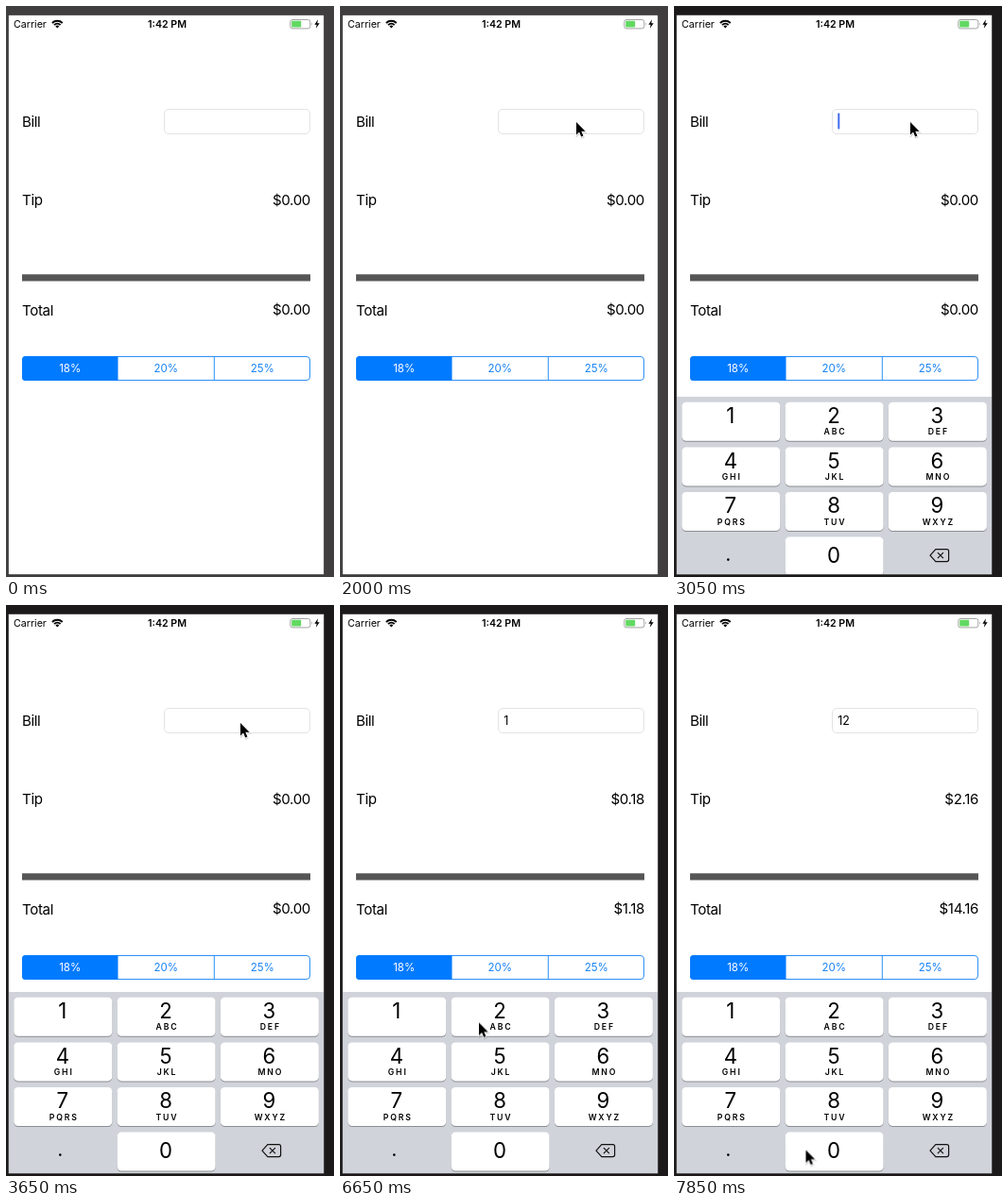
Animation of 347 by 605 pixels, one loop 8000 ms. Source, as an HTML page:

```html
<!DOCTYPE html>
<html lang="en">
<head>
<meta charset="utf-8">
<title>Tip calculator</title>
<style>
html, body { margin: 0; width: 100%; height: 100%; overflow: hidden; }
svg { display: block; width: 347px; height: 605px; font-family: Inter, Roboto, "Liberation Sans", sans-serif; }
.anim { animation: 8s step-end infinite; }

.label { font-size: 15.1px; letter-spacing: -.36px; }
.end { text-anchor: end; }
.status { font-size: 10.66px; }
.entry { font-size: 12.4px; }
.seg { font-size: 11.5px; text-anchor: middle; fill: #1682f5; }
.digit { font-size: 22.2px; text-anchor: middle; }
.letters { font-size: 8.7px; font-weight: 600; letter-spacing: 1.8px; text-anchor: middle; }

#chrome { animation-name: chrome; }
@keyframes chrome { 0% { fill: #403e3e; } 28.75%, 100% { fill: #1b1919; } }

#pad { animation-name: rise; }
@keyframes rise {
  0% { transform: translateY(192px); }
  34.375% { transform: translateY(92px); }
  36.25% { transform: translateY(20px); }
  38.125% { transform: translateY(4px); }
  40% { transform: translateY(1px); }
  41.875%, 100% { transform: none; }
}

#empty { animation-name: empty; }
#one { animation-name: one; }
#twelve { animation-name: twelve; }
@keyframes empty { 0% { opacity: 1; } 66.25%, 100% { opacity: 0; } }
@keyframes one { 0% { opacity: 0; } 66.25% { opacity: 1; } 86.875%, 100% { opacity: 0; } }
@keyframes twelve { 0% { opacity: 0; } 86.875%, 100% { opacity: 1; } }

.press { animation-name: press; }
@keyframes press { 0% { fill: #fff; } 85% { fill: #b9bfc9; } 86.875%, 100% { fill: #fff; } }

#caret { animation-name: blink, shift; }
@keyframes blink {
  0%, 43.75%, 55%, 70%, 81.25%, 94.375%, 100% { opacity: 0; }
  41.875%, 47.5%, 53.125%, 58.75%, 68.125%, 73.75%, 79.375%, 85%, 92.5% { opacity: .5; }
  34.375%, 49.375%, 60.625%, 66.25%, 75.625%, 86.875% { opacity: 1; }
}
@keyframes shift {
  0% { transform: none; }
  66.25% { transform: translateX(6px); }
  86.875%, 100% { transform: translateX(14px); }
}

/* the pointer is sampled every 150 ms along each leg */
#pointer { animation: show 8s step-end infinite, travel 8s steps(1, start) infinite; }
@keyframes show { 0% { opacity: 0; } 6.25%, 100% { opacity: 1; } }
@keyframes travel {
  0%, 6.25% { transform: translate(267px, 453px); }
  8.125%, 11.875% { transform: translate(268px, 453px); }
  11.875% { animation-timing-function: steps(2, start); }
  15.625% { transform: translate(277px, 330px); animation-timing-function: steps(2, start); }
  19.375% { transform: translate(188px, 95px); }
  21.25% { transform: translate(195px, 62px); animation-timing-function: steps(3, start); }
  26.875%, 43.75% { transform: translate(250px, 123px); }
  43.75% { animation-timing-function: steps(2, start); }
  47.5% { transform: translate(248px, 125px); animation-timing-function: steps(2, start); }
  51.25%, 58.75% { transform: translate(247px, 127px); }
  58.75% { animation-timing-function: steps(3, start); }
  64.375% { transform: translate(90px, 405px); }
  64.375% { animation-timing-function: steps(1, start); }
  66.25%, 73.75% { transform: translate(68.5px, 436.7px); }
  73.75% { animation-timing-function: steps(3, start); }
  79.375% { transform: translate(115px, 453px); animation-timing-function: steps(3, start); }
  85%, 88.75% { transform: translate(147px, 442.5px); }
  88.75% { animation-timing-function: steps(2, start); }
  92.5% { transform: translate(146px, 480px); animation-timing-function: steps(3, start); }
  98.125% { transform: translate(141px, 570px); }
  100% { transform: translate(139.5px, 577.5px); }
}
</style>
</head>
<body>
<svg viewBox="0 0 347 605">
  <clipPath id="screen"><rect x="3" y="10" width="333" height="592"/></clipPath>
  <rect id="chrome" class="anim" width="347" height="605"/>
  <rect x="2.5" y="9.5" width="334" height="593" fill="#fff" stroke="#000" stroke-opacity=".45"/>

  <g class="status">
    <text x="8" y="23">Carrier</text>
    <text x="170.5" y="23" text-anchor="middle" font-weight="600">1:42 PM</text>
  </g>
  <g transform="translate(54.3 23.4)">
    <path d="M0 0L-1.9-1.9A2.7 2.7 0 0 1 1.9-1.9Z"/>
    <path d="M-3.3-3.3A4.7 4.7 0 0 1 3.3-3.3M-5.4-5.4A7.7 7.7 0 0 1 5.4-5.4" fill="none" stroke="#000" stroke-width="1.9"/>
  </g>
  <rect x="300.8" y="14.5" width="21" height="9.4" rx="2.2" fill="#fff" stroke="#999" stroke-width=".9"/>
  <rect x="302.2" y="15.8" width="10" height="6.8" rx=".8" fill="#62d962"/>
  <path d="M323 17.6Q324.6 19.2 323 20.8Z" fill="#999"/>
  <path d="M330 14.3L326.4 19.8H328.7L327.9 23.8L331.7 18.2H329.3Z"/>

  <g class="label">
    <text x="17" y="127.8">Bill</text>
    <text x="17" y="211.3">Tip</text>
    <text x="17" y="327.5">Total</text>
  </g>
  <rect x="167.5" y="109.5" width="154" height="26" rx="4.5" fill="#fff" stroke="#e3e3e3"/>
  <rect x="17" y="284.3" width="305" height="7.2" fill="#565656"/>

  <g id="empty" class="anim label end">
    <text x="322" y="211.2">$0.00</text>
    <text x="322" y="326.7">$0.00</text>
  </g>
  <g id="one" class="anim">
    <text class="entry" x="173.3" y="126.8">1</text>
    <text class="label end" x="322" y="211.2">$0.18</text>
    <text class="label end" x="322" y="326.7">$1.18</text>
  </g>
  <g id="twelve" class="anim">
    <text class="entry" x="173.3" y="126.8">12</text>
    <text class="label end" x="322" y="211.2">$2.16</text>
    <text class="label end" x="322" y="326.7">$14.16</text>
  </g>
  <rect id="caret" class="anim" x="173.3" y="113.5" width="2" height="17" rx=".8" fill="#426bf2"/>

  <rect x="17.5" y="371.5" width="304" height="25" rx="3.5" fill="#fff" stroke="#2f8ff5"/>
  <path d="M118.5 371V397H20.5Q17 397 17 393.5V374.5Q17 371 20.5 371Z" fill="#007aff"/>
  <path d="M220.3 372V396" stroke="#2f8ff5"/>
  <g class="seg">
    <text x="67.7" y="388.2" style="fill:#fff">18%</text>
    <text x="169.3" y="388.2">20%</text>
    <text x="271.2" y="388.2">25%</text>
  </g>

  <g clip-path="url(#screen)">
    <g id="pad" class="anim">
      <rect x="3" y="410" width="333" height="193" fill="#d0d3da"/>
      <g id="keys"></g>
      <circle cx="57.3" cy="582.6" r="1.3"/>
      <path d="M276.8 571.6H288.6Q290.6 571.6 290.6 573.6V582.6Q290.6 584.6 288.6 584.6H276.8L271 578.1Z M278.9 575.2L284.9 581.2M284.9 575.2L278.9 581.2" fill="none" stroke="#111" stroke-width="1.2" stroke-linejoin="round"/>
    </g>
  </g>

  <g id="pointer">
    <path id="arrow" d="M0 0V13.5L3.1 10.6L5.2 15.5L7.4 14.6L5.3 9.8H9.6Z" transform="translate(.4 1.2)" stroke="#000" stroke-width="1.6" opacity=".18"/>
    <path d="M0 0V13.5L3.1 10.6L5.2 15.5L7.4 14.6L5.3 9.8H9.6Z" stroke="#fff" stroke-width="1.6" paint-order="stroke"/>
  </g>
</svg>
<script>
const letters = ["", "ABC", "DEF", "GHI", "JKL", "MNO", "PQRS", "TUV", "WXYZ"];

function key(digit, col, row, sub) {
  const x = 8.3 + col * 109.3, y = 415.8 + row * 47.6, mid = x + 52;
  const base = y + (sub === undefined ? 27.6 : 22.3);
  const box = `x="${x}" width="104" height="41" rx="4.5"`;
  return `<rect ${box} y="${y + 1}" fill="#8b8d92"/>
    <rect ${box} y="${y}" fill="#fff" ${digit === 2 ? 'class="anim press"' : ""}/>
    <text class="digit" x="${mid - .5}" y="${base}">${digit}</text>
    <text class="letters" x="${mid + .9}" y="${y + 34.5}">${sub || ""}</text>`;
}

document.getElementById("keys").innerHTML =
  letters.map((sub, i) => key(i + 1, i % 3, Math.floor(i / 3), sub)).join("") + key(0, 1, 3);
</script>
</body>
</html>
```
